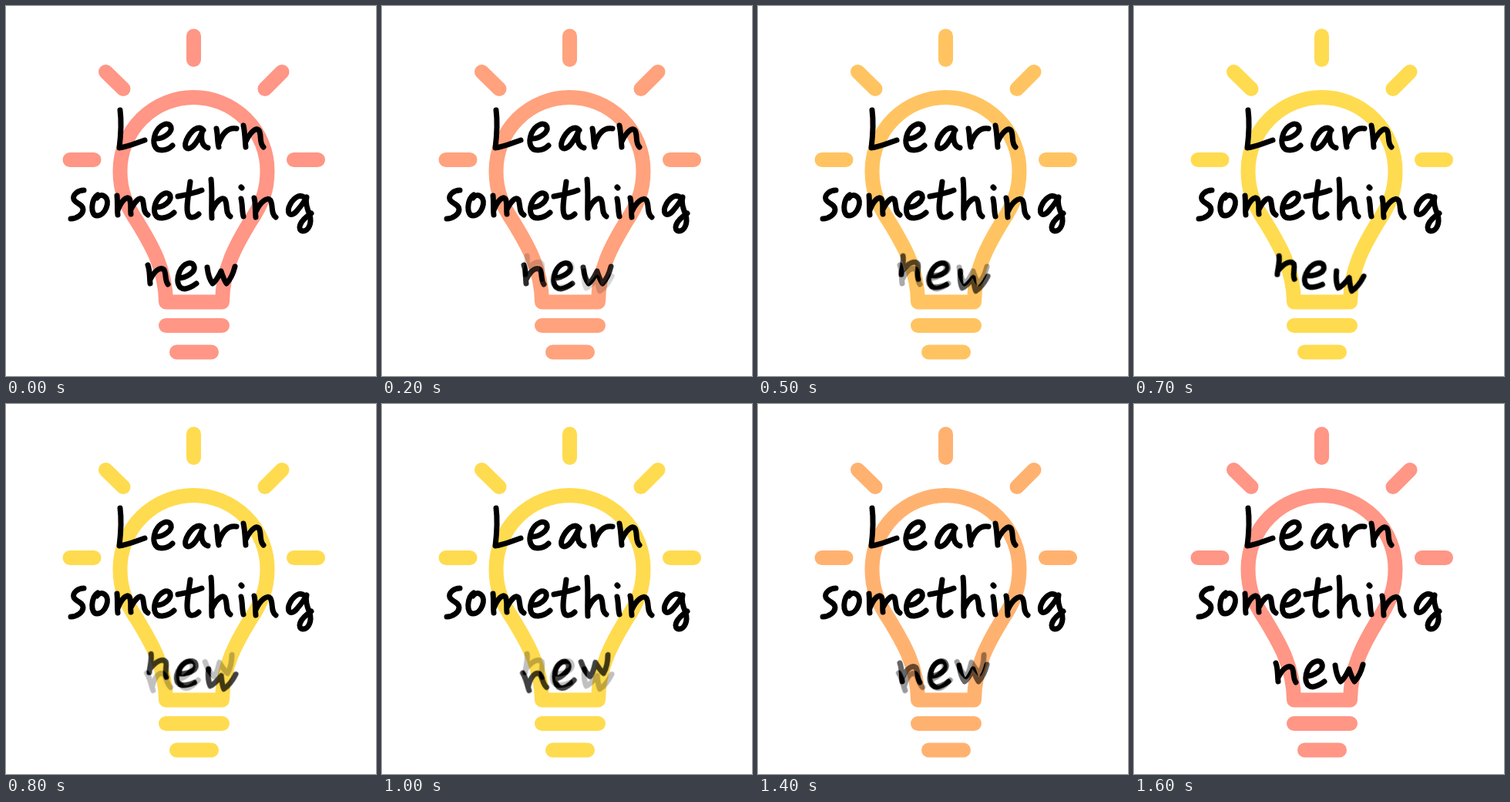
Animation, 480 px wide and 480 px high, one loop 1700 ms. Source, as an HTML page:

```html
<!DOCTYPE html>
<html lang="en">
<head>
<meta charset="utf-8">
<title>Learn something new</title>
<style>
  html, body { margin: 0; width: 100%; height: 100%; overflow: hidden; background: #fff; }
  svg { display: block; width: 100vw; height: 100vh; }
  path { fill: none; stroke-linecap: round; stroke-linejoin: round; }

  .bulb { stroke-width: 19; animation: glow 1.7s infinite; }
  .ink { stroke: #000; stroke-width: 7; }

  /* The three tilts of the last word dissolve into each other. */
  .dissolve { isolation: isolate; }
  .dissolve use { mix-blend-mode: plus-lighter; }
  .level { animation: level 1.7s infinite; }
  .down { animation: down 1.7s infinite; }
  .up { animation: up 1.7s infinite; }

  @keyframes glow {
    0% { stroke: #ff9686; }
    11.764% { stroke: #ff9686; animation-timing-function: steps(6, start); }
    47.058% { stroke: #ffdb4f; }
    70.588% { stroke: #ffdb4f; animation-timing-function: steps(5, start); }
    100% { stroke: #ff9686; }
  }
  @keyframes level {
    0% { opacity: 1; }
    11.764% { opacity: 1; animation-timing-function: steps(6, start); }
    47.058% { opacity: 0; }
    70.588% { opacity: 0; animation-timing-function: steps(5, start); }
    100% { opacity: 1; }
  }
  @keyframes down {
    0% { opacity: 0; }
    11.764% { opacity: 0; animation-timing-function: steps(6, start); }
    47.058% { opacity: 1; animation-timing-function: steps(4, start); }
    70.588%, 100% { opacity: 0; }
  }
  @keyframes up {
    0% { opacity: 0; }
    47.058% { opacity: 0; animation-timing-function: steps(4, start); }
    70.588% { opacity: 1; animation-timing-function: steps(5, start); }
    100% { opacity: 0; }
  }
</style>
</head>
<body>
<svg viewBox="0 0 480 480" role="img" aria-label="Learn something new">
  <defs>
    <g id="new" class="ink">
      <path d="M184 336C187 344 186 352 187 360M187 355C193 343 200 338 205 342C208 347 206 356 210 361"/>
      <path d="M223 353C234 353 246 345 244 338C242 330 230 333 225 345C220 358 224 367 232 367C239 366 243 363 247 360"/>
      <path d="M261 339C262 347 264 355 268 360C273 357 276 350 279 344C281 350 283 356 286 360C291 355 295 346 297 338"/>
    </g>
  </defs>

  <g class="bulb">
    <path d="M207.500 384C207 340 188 309 171 281C155 257 148 240 148 214A95.500 95.500 0 0 1 339 214C339 240 332 257 316 281C299 309 281 340 280.500 384Z"/>
    <path d="M207.500 414.500H280.500M221.500 449H266.500"/>
    <path d="M243.500 39V69.500M83 199.500H114M373.500 199.500H404.500M129.500 85.500L152 107.500M358 85.500L336 107.500"/>
  </g>

  <g class="ink">
    <!-- Learn -->
    <path d="M148 135C150 150 149 167 147 184C158 183 168 178 180 174"/>
    <path d="M193 172C204 173 216 164 214 157C211 149 199 154 194 165C189 178 193 187 202 187C209 187 213 184 216 181"/>
    <path d="M256 161C249 153 239 163 234 174C229 186 238 189 246 178C251 171 254 165 255 161C252 172 254 182 262 184"/>
    <path d="M273 159C275 168 274 176 276 183M276 179C280 167 287 157 299 159"/>
    <path d="M308 155C310 164 310 174 311 183M311 176C317 163 325 157 328 161C332 167 328 177 334 183"/>
    <!-- something -->
    <path d="M101 239C93 239 86 245 88 251C90 256 100 257 100 264C100 270 92 276 84 276"/>
    <path d="M119 245C110 251 109 272 118 272C129 272 136 253 128 247C124 244 120 246 118 249"/>
    <path d="M144 246C145 255 144 264 145 271M145 265C150 252 157 246 160 250C163 256 161 264 162 270M162 264C168 252 174 247 177 251C180 258 177 267 184 271"/>
    <path d="M193 261C204 262 215 253 213 246C210 239 199 244 194 256C190 268 194 276 203 275C210 274 215 271 218 268"/>
    <path d="M239 228C237 245 233 261 236 270C238 277 246 274 250 270M223 247C233 245 244 243 254 239"/>
    <path d="M266 225C268 242 266 259 267 275M267 266C272 254 280 247 284 251C288 258 284 269 291 273"/>
    <path d="M305 250C307 258 306 266 308 273M305 235L306 236"/>
    <path d="M322 249C324 257 323 266 324 274M324 267C330 254 339 247 343 252C347 259 343 269 350 274"/>
    <path d="M388 249C380 242 371 251 367 261C364 271 371 274 378 265C384 258 388 252 390 248C388 255 391 264 394 271C397 281 393 292 385 292C378 291 379 280 396 269"/>
  </g>

  <g class="dissolve">
    <use href="#new" class="level"/>
    <use href="#new" class="down" transform="rotate(12.500 240 349)"/>
    <use href="#new" class="up" transform="rotate(-13 240 349)"/>
  </g>
</svg>
</body>
</html>
```
